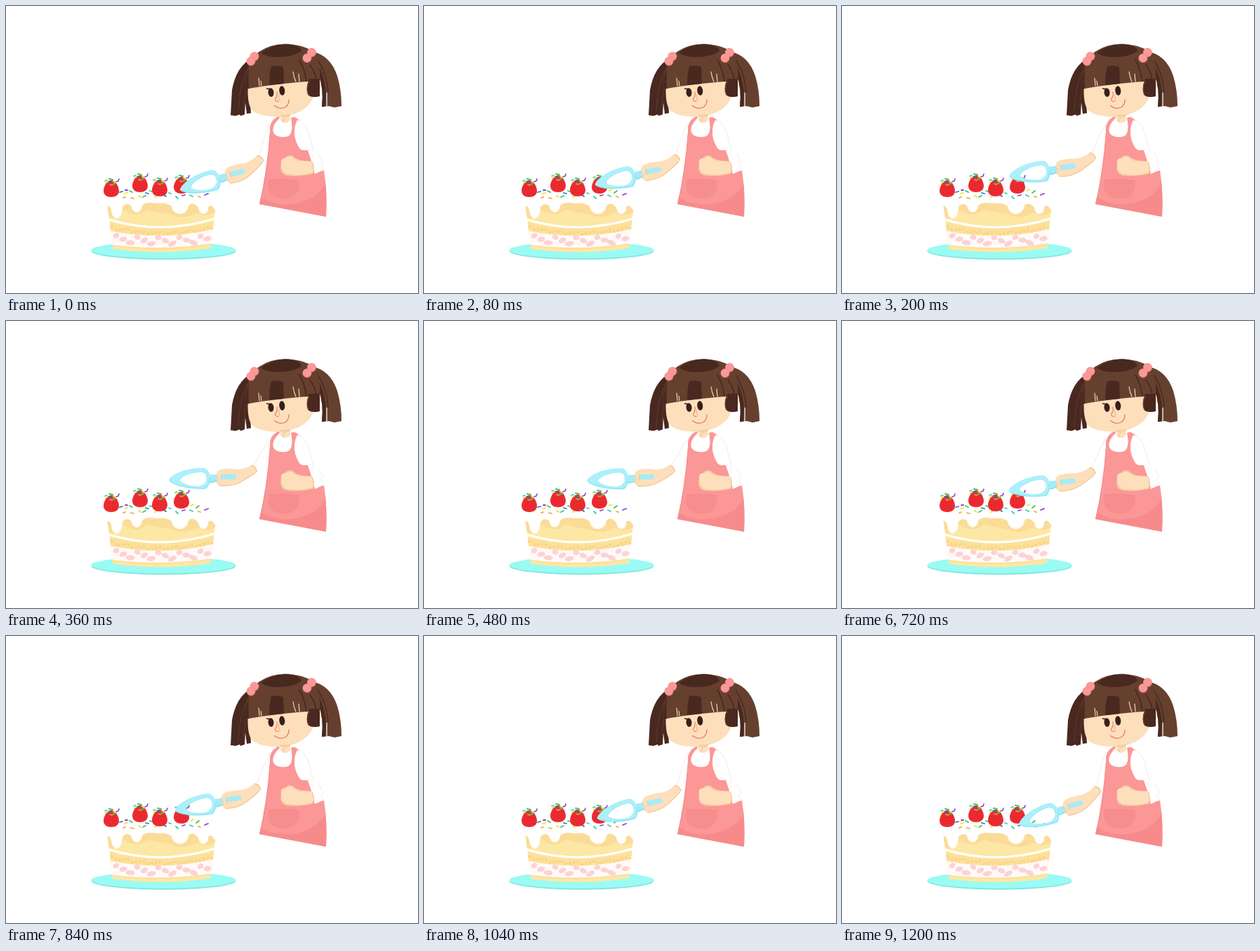
Write an HTML page with a canvas that moves like this. It is 587 by 410 pixels and loops after 1560 ms.

```html
<!DOCTYPE html>
<html lang="en">
<head>
<meta charset="utf-8">
<title>Cake</title>
<style>
html, body { margin: 0; width: 100%; height: 100%; overflow: hidden; background: #fff; }
canvas { display: block; }
</style>
</head>
<body>
<canvas id="stage" width="587" height="410"></canvas>
<script>
const ctx = document.getElementById('stage').getContext('2d');
const LOOP = 1560, STEP = 40;
const SHOULDER = { x: 387, y: 178 };
const SKIN = '#fddfbb', SKIN_SHADE = '#f4c796', PINK = '#fb9797', PINK_DARK = '#f78b8b';
const HAIR = '#66402f', HAIR_DARK = '#48281f', FAINT = '#f8e9e9';
const SPRINKLE = { green: '#3fc653', blue: '#2a6fd0', yellow: '#f4dc2c', purple: '#8a3fd0', orange: '#f5a03a', teal: '#35cfa8' };

function fill(d, color, rule = 'nonzero') {
  ctx.fillStyle = color;
  ctx.fill(new Path2D(d), rule);
}

function line(d, color, width = 1) {
  ctx.strokeStyle = color;
  ctx.lineWidth = width;
  ctx.lineCap = ctx.lineJoin = 'round';
  ctx.stroke(new Path2D(d));
}

function oval(x, y, rx, ry, color, turn = 0) {
  ctx.fillStyle = color;
  ctx.beginPath();
  ctx.ellipse(x, y, rx, ry, turn, 0, Math.PI * 2);
  ctx.fill();
}

function clipped(d, draw) {
  ctx.save();
  ctx.clip(new Path2D(d));
  draw();
  ctx.restore();
}

// Height of a cake layer's curved edge, from y at the sides to y + depth in the middle.
const sag = (x, y, depth) => y + depth * (1 - ((x - 222) / 75) ** 2);

function drawPlate() {
  oval(224.5, 350, 103, 12.4, '#86e5df');
  oval(224.5, 348.7, 103, 11.8, '#99fbf3');
}

function drawCake() {
  const body = 'M143 276L300 276L297 300L292 346Q222 357 152 347L147 303Z';
  clipped(body, () => {
    ctx.fillStyle = '#fde7a5';
    ctx.fillRect(140, 270, 165, 90);
    fill('M140 270H304V290Q288 304 272 295Q254 306 236 298Q214 294 202 291Q186 304 168 291Q158 310 144 300Z', '#fbdb98');
    fill('M146 309Q222 328 299 307L296 321Q222 336 148 321Z', '#fde09a');
    for (let i = 0; i < 26; i++) {
      const x = 151 + i * 5.7;
      oval(x, sag(x, 314 + (i * 7 % 4), 9), 2.6, 1.6, '#f9d488', i);
    }
    fill('M146 321Q222 337 299 318L294 339Q222 350 150 341Z', '#fffaf9');
    for (let i = 0; i < 14; i++) {
      const x = 157 + i * 10;
      oval(x, sag(x, 327 + (i % 3) * 4.3, 4), 4.6 + i % 3, 3.6, '#fcd3d3', -0.5 + (i % 4) * 0.3);
    }
    line('M146 305Q222 328 300 303', '#fff', 3);
    line('M149 342Q222 352 296 340', '#fbdb98', 1.2);
  });
  fill('M142 276Q143 262 175 260Q222 252 270 261Q298 264 301 279Q301 290 297 291' +
    'Q293 282 288 287C289 300 275 301 274 288Q266 279 260 285C259 301 237 301 236 286' +
    'Q228 280 215 282Q200 279 194 285C193 298 180 298 178 285' +
    'Q171 280 166 287C166 309 151 308 150 292Q147 283 145 287Z', '#fff');
  line('M151 293C152 307 165 307 166 287M179 287C182 297 192 297 194 285M237 288C239 299 257 299 260 285M275 289C277 300 287 299 288 287', '#fdf1d9', .8);
}

function drawSprinkles() {
  line('M162 266l4 -1M199 267l4 1M225 270l3 2', SPRINKLE.blue, 1.8);
  line('M169 268l4 -1M189 271l3 2M264 264l3 -2M212 273l3 -2', SPRINKLE.yellow, 1.8);
  line('M176 264l4 2M195 273l4 -2M271 267l4 -3M205 264l3 1', SPRINKLE.green, 1.8);
  line('M178 274l4 1M167 274l3 -1M249 266l3 1M274 272l3 1', SPRINKLE.orange, 1.8);
  line('M242 272l3 3M262 270l4 2M232 267l3 1', SPRINKLE.teal, 1.8);
  line('M251 271l4 -1M283 270l5 -2M170 263l3 0', SPRINKLE.purple, 1.8);
}

function drawStrawberry(x, y) {
  ctx.save();
  ctx.translate(x, y);
  fill('M0 -12C5 -13 11 -4 11 3C11 9 6 12 0 12C-6 12 -11 9 -11 3C-11 -4 -5 -13 0 -12Z', '#ec2b31');
  for (let i = 0; i < 12; i++) {
    oval(-6 + (i % 4) * 4, -2 + Math.floor(i / 4) * 4.2 + (i % 2), .6, .8, '#c61c25');
  }
  line('M-3 -14l5 1M2 -6l4 -2', SPRINKLE.green, 2);
  line('M-4 -10l4 1', SPRINKLE.blue, 2.2);
  line('M-8 -8l3 -2M3 -10l3 1', SPRINKLE.yellow, 1.8);
  line('M-2 -6l3 1', SPRINKLE.orange, 1.6);
  line('M7 -10l3 -1l1 -3', SPRINKLE.purple, 1.6);
  line('M-9 -11l3 -1', SPRINKLE.teal, 1.6);
  ctx.restore();
}

function drawArm(angle) {
  ctx.save();
  ctx.translate(SHOULDER.x, SHOULDER.y);
  ctx.rotate(-angle * Math.PI / 180);
  ctx.translate(-SHOULDER.x, -SHOULDER.y);

  fill('M379 164Q364 184 353 206L358 218Q374 205 390 190Z', '#fff');
  line('M378 165Q364 185 354 205', FAINT, 1);
  fill('M299 224Q299 214 306 212Q318 210 330 212Q343 211 350 205Q357 206 358 215Q348 222 336 229Q323 237 306 236Q298 234 299 224Z', SKIN);
  line('M351 206Q356 209 357 215', SKIN_SHADE, 1.4);
  line('M304 235Q323 237 336 229Q347 223 355 217', SKIN_SHADE, 1.3);

  fill('M286 219Q296 220 303 219H326Q330 223 326 227H303Q297 232 288 231Z', '#a5ebf8');
  line('M289 230Q296 231 301 228', '#7fdbee', 1.3);
  for (const x of [310, 317, 324]) oval(x, 229, 3.7, 3.4, SKIN);
  fill('M301 217Q304 216 306 219L306 230Q303 233 300 230Z', SKIN);
  line('M300 222Q304 225 301 230M307 219Q305 222 307 227', SKIN_SHADE, .9);

  const rim = 'M232 226C241 215 264 209 283 210Q289 212 291 222Q291 235 285 240C264 241 240 236 232 228Z';
  const hole = 'M247 227C253 219 267 215.5 279 215.5Q287 217 286 226Q284 234 275 236C263 236 252 233 247 227Z';
  fill(rim + hole, '#abf0fb', 'evenodd');
  line('M234 229C243 236 265 240 284 239Q290 234 290 224', '#8ae1f1', 1.1);
  line('M247 227C253 219 267 215.5 279 215.5Q287 217 286 226', '#95e5f3', .8);
  ctx.restore();
}

function drawBody() {
  fill('M381 162Q396 155 413 162Q427 167 433 190L454 236L438 244H400L376 200Z', '#fff');
  fill('M391 150H405V163Q398 171 391 163Z', SKIN);
  line('M392 157Q399 160 404 156M397 159L394 166', SKIN_SHADE, 1.2);

  const apron = 'M376 172Q379 161 389 157L390 160C380 169 377 180 385 185Q393 189 402 186C409 182 408 170 406 160' +
    'Q411 157 415 161L418 163C409 172 410 186 415 197Q418 206 424 206L434 205Q437 211 438 219L440 237L453 235' +
    'Q458 266 456 301L361 283Q372 235 376 180Z';
  fill(apron, PINK);
  clipped(apron, () => {
    fill('M360 270Q376 285 405 283Q437 280 453 258L460 240V305H355Z', PINK_DARK);
    fill('M374 249Q396 246 417 250Q420 264 409 272Q396 279 382 272Q370 265 374 249Z', '#f78e8e');
    line('M374 249Q396 246 417 250', '#f58585', 1);
    line('M376 181Q373 235 362 282', '#f68c8c', 1.4);
  });

  fill('M415 163C409 174 410 188 416 199Q419 206 425 206L435 205L438 218L446 211L453 234L440 240L434 218Z', '#fff');
  fill('M415 163Q428 167 431 181L437 205L424 206Q412 198 411 180Z', '#fff');
  line('M417 163Q428 168 432 184L438 207M446 212L452 224L448 227L454 235', FAINT, 1);

  fill('M392 226Q390 218 398 217Q401 212 408 214Q412 219 422 221L436 222Q441 231 437 239Q420 244 400 242Q389 239 392 226Z', SKIN);
  line('M392 229Q391 238 401 241Q419 244 437 239Q440 231 436 223', SKIN_SHADE, 1.3);
  line('M398 217Q402 213 408 215Q412 220 420 222', SKIN_SHADE, 1.1);
}

function drawPigtails() {
  fill('M351 74Q328 86 322 120L320 156L327 157L333 155L334 157L340 155L341 138L343 154L349 153L347 124L358 90Z', HAIR_DARK);
  line('M346 88Q333 108 331 151M350 92Q341 110 339 143', '#57342a', 1.6);
  fill('M436 65Q462 70 472 100Q478 120 478 143L468 145L460 143L450 144Q453 118 446 98Z', HAIR);
  fill('M437 75Q453 91 456 125L455 143L450 144Q453 118 445 98Z', HAIR_DARK);
  line('M443 76Q457 95 459 123', HAIR_DARK, 1.3);
  line('M457 124V144', '#fff', 1.2);
}

function drawHead() {
  const face = 'M345 106C344 126 344 144 353 151Q365 158 382 158C408 158 431 150 438 129Q448 126 449 112Q448 106 441 105Z';
  fill(face, SKIN);
  clipped(face, () => fill('M451 104C445 143 424 155 391 156L388 161H452Z', SKIN_SHADE));
  fill('M341 119C340 94 347 75 361 65Q380 53 402 54.5Q428 56 441 68Q449 87 447 107Q420 108 395 111Q366 114 341 119Z', HAIR);
  fill('M363 67Q379 54 402 54.5Q419 56 421 64Q410 73 387 73Q372 73 363 67Z', HAIR_DARK);
  fill('M378 86Q387 84 395 87L396 111L375 113Q375 96 378 86Z', HAIR_DARK);
  fill('M346 87Q341 101 341 119L346 118Q345 101 346 87Z', HAIR_DARK);
  line('M418 77Q426 91 428 107M433 84Q441 95 442 106', HAIR_DARK, 1.6);
  line('M363 107L364 114M409 94Q410 102 413 108M417 97L418 108M360 103L361 114', SKIN, 1.1);
  fill('M432 104H447V129Q440 131 433 129Q428 126 429 113Z', HAIR_DARK);
  line('M432 108Q427 118 431 127', HAIR, 1.4);

  oval(377.5, 123.5, 4, 6.3, '#371f1b', -.1);
  oval(393.3, 121, 4, 6.7, '#371f1b', -.1);
  line('M371.5 118L378 119', '#371f1b', 1.4);
  line('M386 123Q387 129 384 132Q382 136 388 136.5', '#ef8571', 1.3);
  line('M389 126Q388 132 390 135', '#f3ad8e', 1.1);
  line('M382.5 142.5Q390 148 397 145Q403 142 403 134', '#e67968', 1.3);
}

function drawBobbles() {
  for (const [x, y] of [[354, 72], [349, 79], [435.5, 66.5], [429, 74.5]]) {
    oval(x, y, 6.4, 6.4, '#f58586');
    oval(x - .3, y - .5, 5.9, 5.7, '#fb9898');
  }
}

// The arm lifts briskly, lowers more slowly, then rests.
function armAngle(time) {
  const peak = 400, top = -1.5;
  return time < peak
    ? top + (peak - time) * .0383
    : top + (Math.min(time, 1200) - peak) * .0225;
}

function draw(time) {
  ctx.fillStyle = '#fff';
  ctx.fillRect(0, 0, 587, 410);
  drawPlate();
  drawCake();
  drawSprinkles();
  for (const [x, y] of [[150, 261], [191, 254], [219, 260], [250, 256]]) drawStrawberry(x, y);
  drawArm(armAngle(time));
  drawBody();
  drawPigtails();
  drawHead();
  drawBobbles();
}

const start = performance.now();
function tick() {
  const time = (performance.now() - start) % LOOP;
  draw(Math.floor(time / STEP) * STEP);
  requestAnimationFrame(tick);
}
tick();
</script>
</body>
</html>
```
